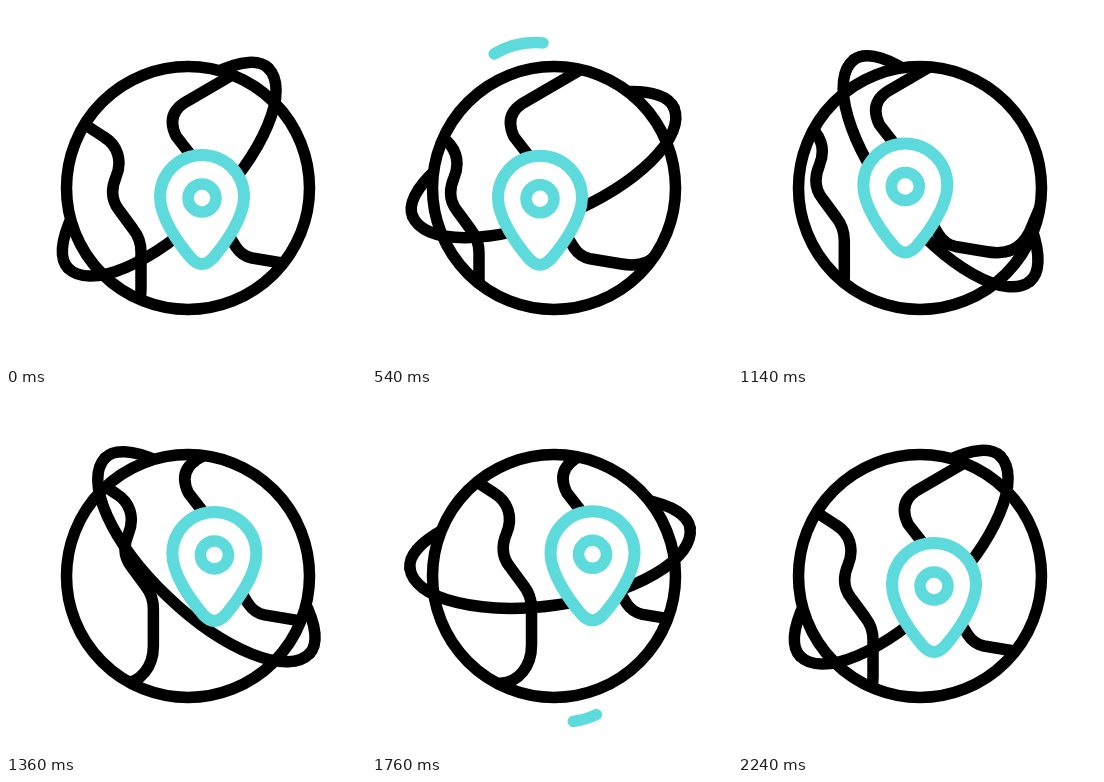
Write an HTML page that moves like this. It is 360 by 360 pixels and loops after 2.4 s.

```html
<!DOCTYPE html>
<html lang="en">
<head>
<meta charset="utf-8">
<title>Globe with pin</title>
<style>
  html, body { margin: 0; width: 100%; height: 100%; overflow: hidden; background: #fff; }
  svg { display: block; width: 100vw; height: 100vh; }
  .ink, .accent { fill: none; stroke: #000; stroke-width: 11.5; stroke-linecap: round; stroke-linejoin: round; }
  .accent { stroke: #5ddadb; }
  .white { fill: #fff; }
</style>
</head>
<body>
<svg viewBox="0 0 360 360">
  <defs>
    <clipPath id="disc"><circle cx="182" cy="182" r="122"/></clipPath>
  </defs>
  <path id="ringBack" class="ink" d="M-141.5 -28A141.5 49 0 0 1 141.5 -28"/>
  <circle class="white" cx="182" cy="182" r="121.5"/>
  <g clip-path="url(#disc)">
    <g id="land" class="ink">
      <path d="M55 103L98 131C111 139 117 154 110 171Q102 190 113 204L127 223Q135 233 135 246V283C135 304 122 320 104 321Q91 322 78 315L60 308"/>
      <path d="M245 58L178 97Q160 109 170 130L184 148"/>
      <path d="M222 228L230 241Q236 250 246 252L276 257C298 261 311 255 320 238L331 212Q335 203 352 185"/>
    </g>
  </g>
  <circle class="ink" cx="182" cy="182" r="121.5"/>
  <path id="ringFront" class="ink" d="M-141.5 -28A141.5 57 0 0 0 141.5 -28"/>
  <g id="pin" class="accent">
    <path fill="#fff" stroke-width="12" d="M154 191A42 42 0 0 1 238 191C238 211 220 237 207 252Q196 264 185 252C172 237 154 211 154 191Z"/>
    <circle cx="196" cy="192" r="14"/>
  </g>
  <path id="dashTop" class="accent"/>
  <path id="dashBottom" class="accent"/>
</svg>
<script>
const LOOP = 2400, STEP = 20, C = 182, DASH_R = 79;
const el = id => document.getElementById(id);
const mix = (a, b, k) => a + (b - a) * k;
el("pin").firstElementChild.style.fill = "#fff";

// 0..1 eased progress of t between a and b
const ease = (t, a, b) => {
  const k = Math.min(1, Math.max(0, (t - a) / (b - a)));
  return k * k * (3 - 2 * k);
};

// time, tilt of the ring in degrees
const tilt = [
  [200, -45], [540, -22.5], [820, 12], [1140, 51.5], [1220, 56],
  [1300, 51.5], [1580, 12.5], [1820, -15], [1940, -29.5], [2240, -45]
];

// smooth curve through keys, flat at the ends and turning points
function curve(keys, t) {
  const last = keys.length - 1;
  if (t <= keys[0][0]) return keys[0][1];
  if (t >= keys[last][0]) return keys[last][1];
  const slope = i => {
    if (i === 0 || i === last) return 0;
    const [a, b, c] = [keys[i - 1], keys[i], keys[i + 1]];
    if ((b[1] - a[1]) * (c[1] - b[1]) <= 0) return 0;
    return (c[1] - a[1]) / (c[0] - a[0]);
  };
  let i = 0;
  while (t > keys[i + 1][0]) i++;
  const [t0, v0] = keys[i], [t1, v1] = keys[i + 1];
  const h = t1 - t0, k = (t - t0) / h, k2 = k * k, k3 = k2 * k;
  return v0 * (2 * k3 - 3 * k2 + 1) + v1 * (3 * k2 - 2 * k3)
    + h * (slope(i) * (k3 - 2 * k2 + k) + slope(i + 1) * (k3 - k2));
}

// short arc around (cx, cy); angles are clockwise degrees from the top
function drawDash(path, cx, cy, tail, head) {
  const point = deg => {
    const a = deg * Math.PI / 180;
    return (cx + DASH_R * Math.sin(a)).toFixed(2) + " " + (cy - DASH_R * Math.cos(a)).toFixed(2);
  };
  path.setAttribute("d", head - tail < 0.5 ? ""
    : `M${point(tail)}A${DASH_R} ${DASH_R} 0 0 1 ${point(head)}`);
}

function draw(t) {
  const left = ease(t, 190, 890), up = ease(t, 890, 1560), home = ease(t, 1560, 2240);
  const x = -56 * left + 87 * up - 31 * home;
  const y = 1.5 * left - 41.5 * up + 40 * home;
  const shift = `translate(${x.toFixed(2)} ${y.toFixed(2)})`;
  el("land").setAttribute("transform", shift);
  el("pin").setAttribute("transform", shift);

  const spin = `translate(${C} ${C}) rotate(${curve(tilt, t).toFixed(2)})`;
  el("ringBack").setAttribute("transform", spin);
  el("ringFront").setAttribute("transform", spin);

  drawDash(el("dashTop"), 163, 115.5, mix(-35, 11, ease(t, 410, 1140)), mix(-35, 11, ease(t, 200, 630)));
  drawDash(el("dashBottom"), 191, 249, mix(155, 197, ease(t, 1875, 2240)), mix(155, 197, ease(t, 1560, 2010)));
}

const start = performance.now();
function tick() {
  const t = (performance.now() - start) % LOOP;
  draw(Math.floor(t / STEP) * STEP);
  requestAnimationFrame(tick);
}
tick();
</script>
</body>
</html>
```
